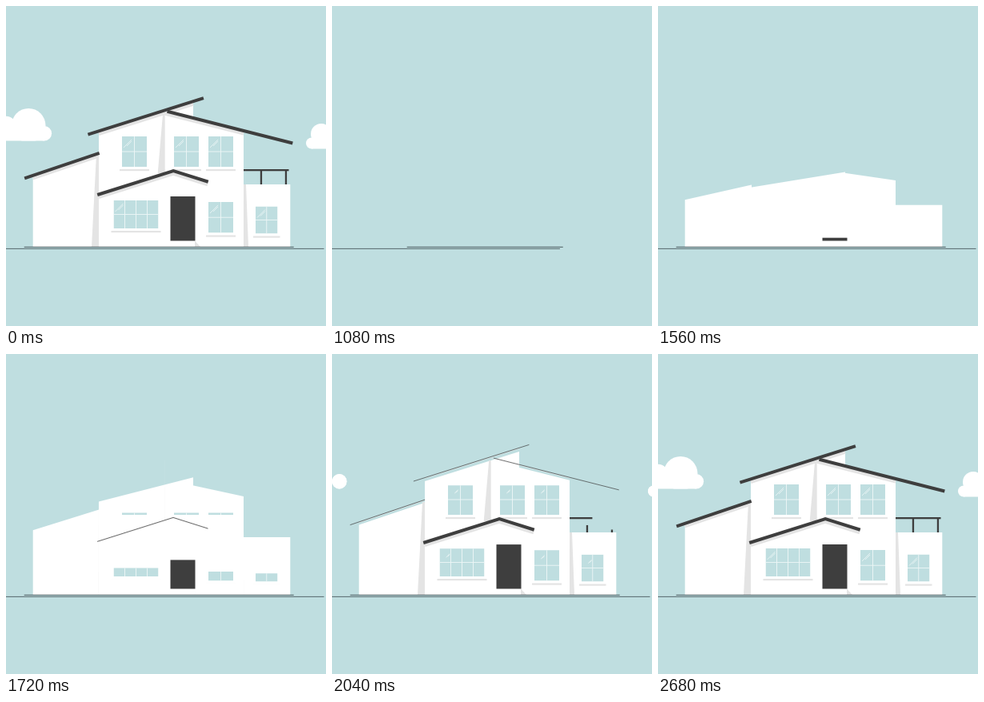
Animation of 400 by 400 pixels, one loop 3480 ms. Source, as an HTML page with a canvas:

```html
<!DOCTYPE html>
<html lang="en">
<head>
<meta charset="utf-8">
<title>House being built</title>
<style>
  html, body { margin: 0; width: 100%; height: 100%; overflow: hidden; background: #bfdee0; }
  canvas { display: block; width: 400px; height: 400px; }
</style>
</head>
<body>
<canvas id="stage"></canvas>
<script>
const LOOP = 3480, HIDE = 720, DONE = 2680, STEP = 40;
const SKY = '#bfdee0', DARK = '#3e3e3e', SHADE = '#e4e4e4', LINE = '#4c5c5f';
const WHITE = '#fff', GLASS = '#eef7f7';
const FLOOR = 301, THICK = 4, PITCH = .316;

const canvas = document.getElementById('stage');
const ctx = canvas.getContext('2d');
const dpr = window.devicePixelRatio || 1;
canvas.width = canvas.height = 400 * dpr;

// cubic-bezier(.33, 0, .2, 1), solved by bisection
function ease(x) {
  if (x <= 0) return 0;
  if (x >= 1) return 1;
  let lo = 0, hi = 1;
  for (let i = 0; i < 24; i++) {
    const s = (lo + hi) / 2, r = 1 - s;
    if (.99 * r * r * s + .6 * r * s * s + s * s * s < x) lo = s; else hi = s;
  }
  return lo * lo * (3 - 2 * lo);
}

let now = 0;
const grow = (start, span) => ease((now - start) / span);

function trace(points) {
  ctx.beginPath();
  points.forEach(([x, y]) => ctx.lineTo(x, y));
}

function fill(points, color) {
  ctx.fillStyle = color;
  trace(points);
  ctx.fill();
}

function stroke(points, width, color) {
  if (width <= 0) return;
  ctx.strokeStyle = color;
  ctx.lineWidth = width;
  trace(points);
  ctx.stroke();
}

function box(x, y, w, h, color) {
  ctx.fillStyle = color;
  ctx.fillRect(x, y, w, h);
}

function disc(x, y, r) {
  ctx.beginPath();
  ctx.arc(x, y, r, 0, 7);
  ctx.fill();
}

// Each roof is the height of its top edge at x.
const slope = (x0, y0, m) => x => y0 + m * (x - x0);
const wingRoof = slope(22.5, 213.3, -.337);
const tallRoof = slope(101.8, 158.7, -PITCH);
const rightRoof = slope(202, 129.7, .254);
const porchRoof = x => 204 + PITCH * Math.abs(x - 209);
const terrace = () => 223 - THICK;

const along = (roof, xs) => xs.map(x => [x, roof(x)]);
const shift = (points, dx, dy) => points.map(([x, y]) => [x + dx, y + dy]);

// Walls rise from the floor to just under their roof.
function wall(roof, x0, x1, k) {
  const top = x => FLOOR - (FLOOR - roof(x) - THICK) * k;
  if (k) fill([[x0, FLOOR], ...along(top, [x0, x1]), [x1, FLOOR]], WHITE);
}

// Roofs and the shade beneath them thicken downwards.
function beam(roof, xs, k) {
  const points = along(roof, xs), [a, b] = [points[0], points[points.length - 1]];
  const lean = (a[1] - b[1]) / (b[0] - a[0]);
  stroke(shift(points, 2 * lean * k, THICK / 2 * k), THICK * k, DARK);
}

const eave = (roof, xs, k) =>
  stroke(shift(along(roof, xs), 0, 1.45 * THICK * k), THICK * k, SHADE);

// Corner shadows open sideways from a fixed edge.
const wedge = (edge, top, bottom, w0, w1, k) =>
  k && fill([[edge, top], [edge + w0 * k, top], [edge + w1 * k, bottom], [edge, bottom]], SHADE);

function pane(x, y, w, h, cols, start) {
  const k = grow(start, 500);
  box(x - 3, y + h + 3, w + 6, 2.2 * grow(start + 85, 350), SHADE);
  if (!k) return;
  ctx.save();
  ctx.beginPath();
  ctx.rect(x, y + h * (1 - k), w, h * k);
  ctx.clip();
  box(x, y, w, h, SKY);
  for (let i = 1; i < cols; i++) {
    const px = x + w * i / cols;
    stroke([[px, y], [px, y + h]], .9, GLASS);
  }
  stroke([[x, y + h / 2], [x + w, y + h / 2]], .9, GLASS);
  const g = grow(1920, 400);
  for (const r of [5 * g, 3 * g]) {
    const cx = x + 13 - r - 1 * g, cy = y + 9;
    stroke([[cx - r, cy + r], [cx + r, cy - r]], g && .8, GLASS);
  }
  ctx.restore();
}

// A dot stretches into a bar, then two bumps swell above it.
function cloud(cx, cy, r, half, dx, dy, big) {
  const dot = r * grow(1900, 145);
  if (!dot) return;
  const w = half * grow(2025, 500), k = grow(2180, 480);
  ctx.fillStyle = WHITE;
  disc(cx - w, cy, dot);
  disc(cx + w, cy, dot);
  ctx.fillRect(cx - w, cy - dot, 2 * w, 2 * dot);
  ctx.save();
  ctx.beginPath();
  ctx.rect(0, 0, 400, cy + r);
  ctx.clip();
  disc(cx + dx * k, cy + dy * k, big * k);
  disc(cx - dx / 2 * k, cy + dy * .8 * k, big * .64 * k);
  ctx.restore();
}

function house() {
  const side = grow(1303, 625), mid = grow(1280, 842), right = grow(1284, 765);
  const corner = grow(1695, 340), porch = grow(1640, 400), top = grow(1963, 400);

  wall(wingRoof, 33.7, 117, side);
  eave(wingRoof, [33.7, 116], top);
  wedge(116, 185, FLOOR, -3, -9, corner);

  wall(terrace, 297, 355.3, side);
  wedge(297, 223, FLOOR, 3, 6, corner);

  wall(tallRoof, 116, 234, mid);
  eave(tallRoof, [116, 234], top);
  wall(rightRoof, 233.5, 297, right);
  eave(rightRoof, [199, 297], top);
  wedge(198.7, 133, 209, -2.5, -9, corner);

  for (const x of [145, 210, 253]) pane(x, 163, 31, 38, 2, 1658);
  pane(134.5, 243, 56, 35, 4, 1598);
  pane(253, 245, 31, 38.5, 2, 1598);
  pane(312, 250.5, 27.5, 34, 2, 1598);

  const door = 55.5 * grow(1484, 592), step = 293.5;
  wedge(236, step, FLOOR, 0, 7, corner);
  box(205.5, step - door, 31, door, DARK);

  eave(porchRoof, [116, 209, 252], porch);
  beam(porchRoof, [114, 209, 252.5], porch);

  box(297, 204, 56.5 * grow(1936, 320), 2.3, DARK);
  for (const i of [0, 1]) {
    const h = 18 * grow(1936 + 40 * i, 320);
    box(317.8 + 31 * i, 223 - h, 2.3, h, DARK);
  }

  beam(wingRoof, [22.5, 116], top);
  beam(rightRoof, [202, 358.8], top);
  beam(tallRoof, [101.8, 246.3], top);
}

function draw(time) {
  // Past the end of the build every part is at rest.
  const built = time < HIDE || time >= DONE;
  now = built ? LOOP : Math.floor(time / STEP) * STEP;
  ctx.setTransform(dpr, 0, 0, dpr, 0, 0);
  box(0, 0, 400, 400, SKY);

  cloud(9.2, 159.3, 9.2, 38.7, 19, -10, 21.3);
  cloud(402, 171.5, 7, 20, -8, -11.5, 13);
  house();

  const ground = 397.5 * grow(780, 680), base = 168.5 * grow(835, 680);
  stroke([[0, 303.4], [ground, 303.4]], ground && .9, LINE);
  stroke([[191.2 - base, 301.3], [191.2 + base, 301.3]], base && 1, LINE);
}

const begin = performance.now();
function tick() {
  draw((performance.now() - begin) % LOOP);
  requestAnimationFrame(tick);
}
tick();
</script>
</body>
</html>
```
